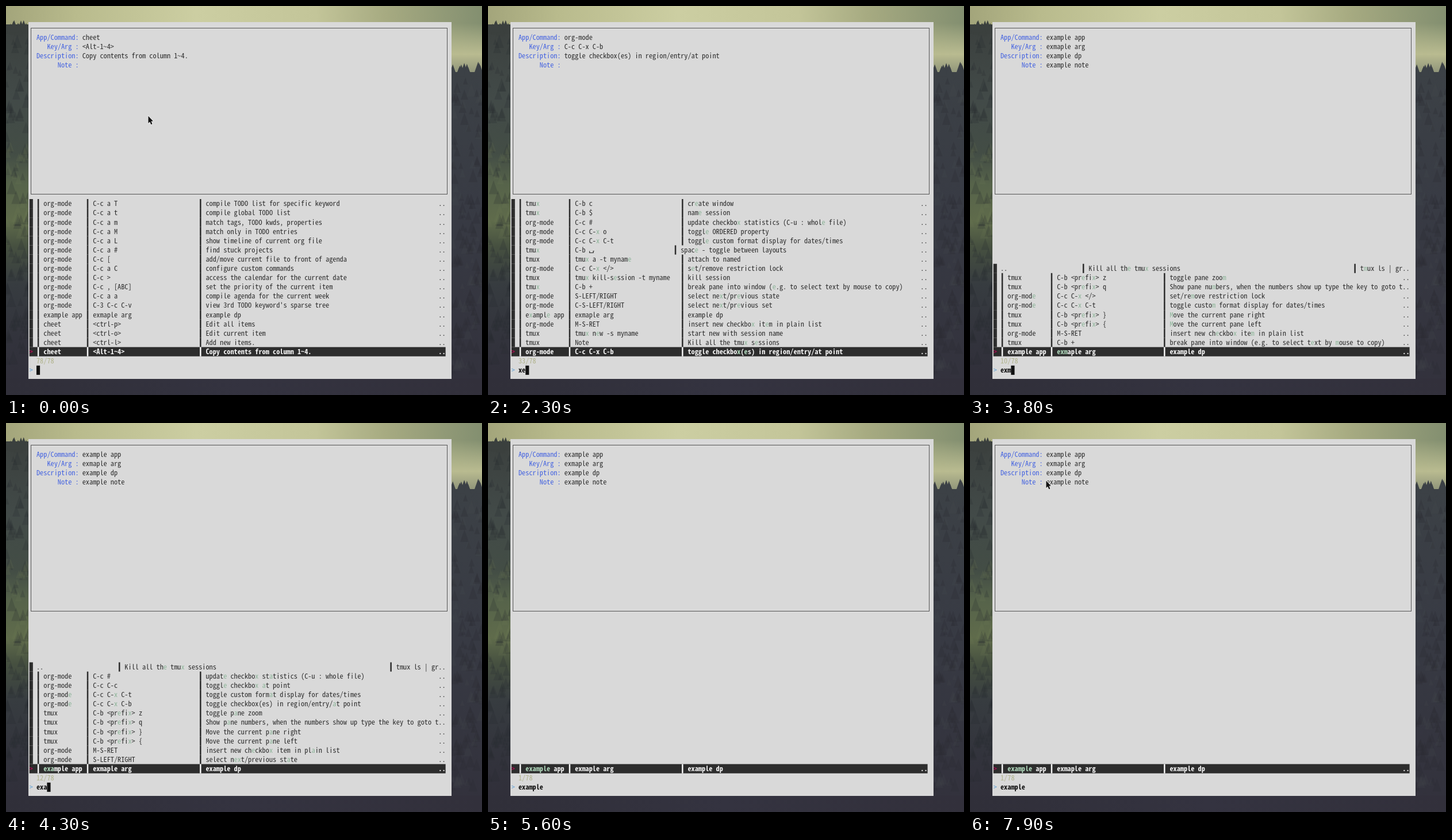
An HTML page with a canvas for the animation above (8000 ms loop, 828 px wide and 677 px high).

```html
<!DOCTYPE html>
<html lang="en">
<head>
<meta charset="utf-8">
<title>Cheat sheet finder</title>
<style>
html, body { margin: 0; width: 100%; height: 100%; overflow: hidden; background: #32313c; }
canvas { display: block; }
</style>
</head>
<body>
<canvas id="stage" width="828" height="677"></canvas>
<script>
const W = 828, H = 677, LOOP = 8000;
const ctx = document.getElementById('stage').getContext('2d');

// Terminal grid
const CELL = 6.135, PITCH = 16.1, LEFT = 40.7, TOP = 46.2;
const LAST = 34, COUNT = 35, PROMPT = 36;
const INK = '#2d2d2d', PAPER = '#d9d9d9', MATCH = '#8db599', MATCH_SEL = '#b0d8bc';
const FAMILY = '"Noto Sans Mono CJK SC", "Noto Sans Mono CJK JP", "Noto Sans Mono", monospace';
ctx.font = '100px ' + FAMILY;
const SIZE = Math.min(CELL * 2, CELL * 108 / ctx.measureText('0').width);

const colX = c => LEFT + c * CELL;
const rowY = r => TOP + r * PITCH;

// Fields are split by ";", "^" marks a matched letter,
// rows starting with "@" give a column for every field.
const sel = 'org-mode;C-c C-^x C-b;toggle checkbox(es) in region/entry/at point';
const lists = {
  all: [
    'org-mode;C-c a T;compile TODO list for specific keyword',
    'org-mode;C-c a t;compile global TODO list',
    'org-mode;C-c a m;match tags, TODO kwds, properties',
    'org-mode;C-c a M;match only in TODO entries',
    'org-mode;C-c a L;show timeline of current org file',
    'org-mode;C-c a #;find stuck projects',
    'org-mode;C-c [;add/move current file to front of agenda',
    'org-mode;C-c a C;configure custom commands',
    'org-mode;C-c >;access the calendar for the current date',
    'org-mode;C-c , [ABC];set the priority of the current item',
    'org-mode;C-c a a;compile agenda for the current week',
    "org-mode;C-3 C-c C-v;view 3rd TODO keyword's sparse tree",
    'example app;exmaple arg;example dp',
    'cheet;<ctrl-p>;Edit all items',
    'cheet;<ctrl-o>;Edit current item',
    'cheet;<ctrl-l>;Add new items.',
    'cheet;<Alt-1~4>;Copy contents from column 1~4.'
  ],
  x: [
    'tmu^x;C-b f;find window',
    'tmu^x;C-b c;create window',
    'tmu^x;C-b +;break pane into window (e.g. to select text by mouse to copy)',
    'tmu^x;C-b $;name session',
    'org-mode;S-LEFT/RIGHT;select ne^xt/previous state',
    'org-mode;M-S-RET;insert new checkbo^x item in plain list',
    'org-mode;C-S-LEFT/RIGHT;select ne^xt/previous set',
    'org-mode;C-c #;update checkbo^x statistics (C-u : whole file)',
    'org-mode;C-c C-c;toggle checkbo^x at point',
    'e^xample app;exmaple arg;example dp',
    'tmu^x;C-b ⎵;space - toggle between layouts',
    "@2:..;27:│ tmux ls | grep : | cut -d. -f1 | awk '{print substr($1, 0, length($1)-1)}' | ^xargs kill │",
    'tmux;C-b ^x;kill pane',
    'org-mode;C-c C-^x </>;set/remove restriction lock',
    'org-mode;C-c C-^x o;toggle ORDERED property',
    'org-mode;C-c C-^x C-t;toggle custom format display for dates/times',
    sel
  ],
  xe: [
    'tmu^x;C-b c;cr^eate window',
    'tmu^x;C-b $;nam^e session',
    'org-mode;C-c #;update checkbo^x statistics (C-u : whol^e file)',
    'org-mode;C-c C-^x o;toggl^e ORDERED property',
    'org-mode;C-c C-^x C-t;toggl^e custom format display for dates/times',
    'tmu^x;C-b ⎵;spac^e - toggle between layouts',
    'tmux;tmu^x a -t mynam^e;attach to named',
    'org-mode;C-c C-^x </>;s^et/remove restriction lock',
    'tmux;tmu^x kill-s^ession -t myname;kill session',
    'tmu^x;C-b +;break pane into window (^e.g. to select text by mouse to copy)',
    'org-mode;S-LEFT/RIGHT;select ne^xt/pr^evious state',
    'org-mode;C-S-LEFT/RIGHT;select ne^xt/pr^evious set',
    'e^xampl^e app;exmaple arg;example dp',
    'org-mode;M-S-RET;insert new checkbo^x it^em in plain list',
    'tmux;tmu^x n^ew -s myname;start new with session name',
    'tmux;Note;Kill all the tmu^x s^essions',
    'org-mode;C-c C-x C-b;toggle checkbo^x(^es) in region/entry/at point'
  ],
  e: [
    'org-mod^e;C-c a T;compile TODO list for specific keyword',
    'org-mod^e;C-c a t;compile global TODO list',
    'org-mod^e;C-c a L;show timeline of current org file',
    'org-mod^e;C-c a #;find stuck projects',
    'org-mod^e;C-c a C;configure custom commands',
    'org-mod^e;C-c a a;compile agenda for the current week',
    'ch^eet;<ctrl-l>;Add new items.',
    'ch^eet;<Alt-1~4>;Copy contents from column 1~4.',
    'tmux;C-b c;cr^eate window',
    'tmux;C-b $;nam^e session',
    'tmux;C-b x;kill pan^e',
    'tmux;Note;Kill all th^e tmux sessions',
    'org-mode;C-c a M;match only in TODO ^entries',
    'org-mode;C-c C-x C-b;toggle checkbox(^es) in region/entry/at point',
    '^example app;exmaple arg;example dp',
    'cheet;<ctrl-o>;^Edit current item',
    'cheet;<ctrl-p>;^Edit all items'
  ],
  ex: [
    'org-mode;C-c #;updat^e checkbo^x statistics (C-u : whole file)',
    'org-mode;C-c C-c;toggl^e checkbo^x at point',
    '@2:..;25:│ Kill all th^e tmu^x sessions;102:│ tmux ls | gr',
    'org-mod^e;C-c C-^x o;toggle ORDERED property',
    'org-mod^e;C-c C-^x </>;set/remove restriction lock',
    'org-mod^e;C-c C-^x C-t;toggle custom format display for dates/times',
    'org-mod^e;C-c C-^x C-b;toggle checkbox(es) in region/entry/at point',
    'tmux;C-b <pr^efi^x> z;toggle pane zoom',
    'tmux;C-b <pr^efi^x> q;Show pane numbers, when the numbers show up type the key to goto t',
    'tmux;C-b <pr^efi^x> };Move the current pane right',
    'tmux;C-b <pr^efi^x> {;Move the current pane left',
    'org-mode;M-S-RET;insert new ch^eckbo^x item in plain list',
    'org-mode;S-LEFT/RIGHT;select n^e^xt/previous state',
    'org-mode;C-S-LEFT/RIGHT;select n^e^xt/previous set',
    'tmux;C-b +;break pane into window (e.g. to select t^e^xt by mouse to copy)',
    'tmux;C-b ⎵;spac^e - toggle between layouts',
    '^e^xample app;exmaple arg;example dp'
  ],
  exm: [
    '@2:..;25:│ Kill all th^e tmu^x sessions;102:│ t^mux ls | gr',
    'tmux;C-b <pr^efi^x> z;toggle pane zoo^m',
    'tmux;C-b <pr^efi^x> q;Show pane nu^mbers, when the numbers show up type the key to goto t',
    'org-mod^e;C-c C-^x </>;set/re^move restriction lock',
    'org-mod^e;C-c C-^x C-t;toggle custo^m format display for dates/times',
    'tmux;C-b <pr^efi^x> };^Move the current pane right',
    'tmux;C-b <pr^efi^x> {;^Move the current pane left',
    'org-mode;M-S-RET;insert new ch^eckbo^x ite^m in plain list',
    'tmux;C-b +;break pane into window (e.g. to select t^ext by ^mouse to copy)',
    'example app;^e^x^maple arg;example dp'
  ],
  exa: [
    '@2:..;25:│ Kill all th^e tmu^x sessions;102:│ tmux ls | gr',
    'org-mode;C-c #;updat^e checkbo^x st^atistics (C-u : whole file)',
    'org-mode;C-c C-c;toggl^e checkbo^x ^at point',
    'org-mod^e;C-c C-^x C-t;toggle custom form^at display for dates/times',
    'org-mod^e;C-c C-^x C-b;toggle checkbox(es) in region/entry/^at point',
    'tmux;C-b <pr^efi^x> z;toggle p^ane zoom',
    'tmux;C-b <pr^efi^x> q;Show p^ane numbers, when the numbers show up type the key to goto t',
    'tmux;C-b <pr^efi^x> };Move the current p^ane right',
    'tmux;C-b <pr^efi^x> {;Move the current p^ane left',
    'org-mode;M-S-RET;insert new ch^eckbo^x item in pl^ain list',
    'org-mode;S-LEFT/RIGHT;select n^e^xt/previous st^ate',
    '^e^x^ample app;exmaple arg;example dp'
  ],
  exam: [
    'org-mod^e;C-c C-^x C-t;toggle custom form^at display for dates/ti^mes',
    'org-mode;M-S-RET;insert new ch^eckbo^x item in pl^ain list',
    'tmux;C-b <pr^efi^x> q;Show p^ane nu^mbers, when the numbers show up type the key to goto t',
    '^e^x^a^mple app;exmaple arg;example dp'
  ],
  examp: [
    '@2:..-b <pr^efi^x> q;33:│ Show p^ane numbers, when the nu^mbers show up type the key to goto that ^pane │',
    '^e^x^a^m^ple app;exmaple arg;example dp'
  ],
  exampl: ['^e^x^a^m^p^le app;exmaple arg;example dp'],
  example: ['^e^x^a^m^p^l^e app;exmaple arg;example dp']
};

const notes = { 'example app': 'example note' };

// time, query, matches
const typing = [
  [0, '', 78], [1100, 'x', 39], [2300, 'xe', 33], [3200, 'e', 62], [3500, 'ex', 25],
  [3800, 'exm', 10], [4200, 'ex', 25], [4300, 'exa', 12], [4600, 'exam', 4],
  [4800, 'examp', 2], [5000, 'exampl', 1], [5100, 'example', 1]
];
const caret = [
  [0, 'block'], [600, 'none'], [1100, 'block'], [1700, 'none'], [2300, 'block'],
  [5600, 'none'], [6200, 'block'], [6700, 'hollow'], [7100, 'block'], [7600, 'none']
];
const mouse = [
  [0, 247, 191], [1100], [6600, 162, 62], [6700, 39, 32], [6900, 123, -6],
  [7000, 102, 12], [7100, 86, 42], [7200, 81, 70], [7300, 91, 90], [7400, 112, 95],
  [7500, 141, 82], [7600, 170, 58], [7700, 193, 37], [7800, 219, 60], [7900, 132, 100]
];
const at = (steps, t) => steps.filter(s => s[0] <= t).pop();

function put(text, col, row, color = INK, match = color, bold = false) {
  ctx.font = (bold ? 'bold ' : '') + SIZE + 'px ' + FAMILY;
  ctx.textAlign = 'center';
  let marked = false;
  for (const ch of text) {
    if (ch === '^') { marked = true; continue; }
    const x = colX(col++), y = rowY(row);
    ctx.fillStyle = marked ? match : color;
    marked = false;
    if (ch === '│') ctx.fillRect(x + 1.9, y, 2.5, PITCH);
    else if (ch === '⎵') openBox(x, y + 11);
    else if (ch !== ' ') ctx.fillText(ch, x + CELL / 2, y + 12.3);
  }
}

function openBox(x, y) {
  ctx.strokeStyle = INK;
  ctx.lineWidth = 1.2;
  ctx.beginPath();
  ctx.moveTo(x + 1, y - 1);
  ctx.lineTo(x + 1, y + 2);
  ctx.lineTo(x + 7.5, y + 2);
  ctx.lineTo(x + 7.5, y - 1);
  ctx.lineTo(x + 9, y - 1);
  ctx.stroke();
}

function drawItem(item, row, chosen) {
  ctx.fillStyle = INK;
  ctx.fillRect(LEFT, rowY(row), chosen ? 118 * CELL : CELL, PITCH);
  const write = (s, col) =>
    put(s, col, row, chosen ? '#f4f4f4' : INK, chosen ? MATCH_SEL : MATCH, chosen);
  if (chosen) put('>', 0, row, '#d7005f');
  if (item[0] === '@') {
    for (const part of item.slice(1).split(';')) {
      const cut = part.indexOf(':');
      write(part.slice(cut + 1), +part.slice(0, cut));
    }
    if (item.endsWith('kill │')) return write('', 0);
  } else {
    const [app, key, text] = item.split(';');
    const shift = key.includes('⎵') ? 2 : 0;
    write('│ ' + app, 2);
    write('│ ' + key, 16);
    write('│ ' + text, 48 - shift);
  }
  write('..', 116);
}

function drawPreview(item) {
  const [app, key, text] = item.replace(/\^/g, '').split(';');
  const lines = [
    ['App/Command:', app], ['   Key/Arg :', key],
    ['Description:', text], ['      Note :', notes[app] || '']
  ];
  lines.forEach(([label, value], i) => {
    put(label, 2, i, '#4463e0');
    put(value, 15, i);
  });
}

function drawCaret(col, kind) {
  const x = colX(col), y = rowY(PROMPT);
  if (kind === 'block') {
    ctx.fillStyle = '#111';
    ctx.fillRect(x, y, CELL, PITCH);
  } else if (kind === 'hollow') {
    ctx.strokeStyle = '#111';
    ctx.lineWidth = 1;
    ctx.strokeRect(95.5, 625.5, 7, 16);
  }
}

function drawMouse(x, y) {
  ctx.save();
  ctx.translate(x, y);
  ctx.beginPath();
  ctx.moveTo(0.5, 0.5);
  for (const [px, py] of [[.5, 13], [3.3, 10.4], [5.3, 15.2], [7.4, 14.3], [5.4, 9.6], [9, 9.4]])
    ctx.lineTo(px, py);
  ctx.closePath();
  ctx.strokeStyle = '#eee';
  ctx.lineWidth = 1.6;
  ctx.stroke();
  ctx.fillStyle = '#111';
  ctx.fill();
  ctx.restore();
}

// Misty forest backdrop, painted once
function makeBackdrop() {
  const cv = document.createElement('canvas');
  cv.width = W; cv.height = H;
  const g = cv.getContext('2d');
  let seed = 7;
  const rnd = () => (seed = seed * 16807 % 2147483647) / 2147483647;
  const wash = (x, y, w, h, down, stops) => {
    const grad = down ? g.createLinearGradient(0, y, 0, y + h) : g.createLinearGradient(x, 0, x + w, 0);
    stops.forEach(([p, c]) => grad.addColorStop(p, c));
    g.fillStyle = grad;
    g.fillRect(x, y, w, h);
  };
  const trees = (x, w, y0, y1, n, tone) => {
    g.fillStyle = tone;
    for (let i = 0; i < n; i++) {
      const tx = x + rnd() * w, ty = y0 + rnd() * (y1 - y0), s = 5 + rnd() * 7;
      g.beginPath();
      g.moveTo(tx, ty - s);
      g.lineTo(tx + s * .7, ty + s);
      g.lineTo(tx - s * .7, ty + s);
      g.fill();
    }
  };
  wash(0, 0, W, 140, false, [[0, '#a3a57b'], [.15, '#b9bb8d'], [.4, '#cccea2'],
    [.65, '#c3c599'], [.8, '#a6aa81'], [1, '#838f70']]);
  wash(770, 30, 58, 90, true, [[0, 'rgba(190,192,148,0)'], [.6, '#b9bb90'], [1, '#8b9077']]);
  wash(0, 32, 40, 645, true, [[0, '#3b403e'], [.2, '#424a48'], [.35, '#434d45'], [.43, '#56634a'],
    [.53, '#5f6b4b'], [.6, '#465040'], [.7, '#373c40'], [.85, '#32333c'], [1, '#302e39']]);
  wash(774, 115, 54, 562, true, [[0, '#3c4146'], [.4, '#383b44'], [1, '#32313c']]);
  wash(0, 648, W, 29, false, [[0, '#302f39'], [.5, '#343340'], [1, '#32303b']]);
  trees(0, 38, 32, 42, 12, '#3b403e');
  trees(774, 54, 106, 122, 16, '#3c4146');
  trees(0, 40, 60, 620, 90, 'rgba(38,42,44,.22)');
  trees(0, 40, 240, 400, 25, 'rgba(110,124,84,.16)');
  trees(774, 54, 130, 640, 100, 'rgba(42,44,52,.28)');
  trees(774, 54, 130, 640, 40, 'rgba(80,86,84,.13)');
  return cv;
}
const backdrop = makeBackdrop();

function draw(t) {
  const [, query, count] = at(typing, t);
  const list = lists[query || 'all'];
  // The preview follows the first key a moment later
  const shown = t >= 1100 && t < 1200 ? lists.all : list;

  ctx.drawImage(backdrop, 0, 0);
  ctx.fillStyle = PAPER;
  ctx.fillRect(39, 28, 736, 621);
  ctx.strokeStyle = '#555';
  ctx.lineWidth = 1;
  ctx.strokeRect(43.5, 38.5, 724, 289);

  drawPreview(shown[shown.length - 1]);
  list.forEach((item, i) => {
    const row = LAST - list.length + 1 + i;
    drawItem(item, row, row === LAST);
  });
  put(count + '/78', 2, COUNT, '#b0b38c');
  put('>', 0, PROMPT, '#5c9fd6');
  put(query, 2, PROMPT, '#111', '#111', true);
  drawCaret(2 + query.length, at(caret, t)[1]);

  const [, mx, my] = at(mouse, t);
  if (mx !== undefined) drawMouse(mx, my);
}

function tick() {
  draw(performance.now() % LOOP);
  requestAnimationFrame(tick);
}
tick();
</script>
</body>
</html>
```
